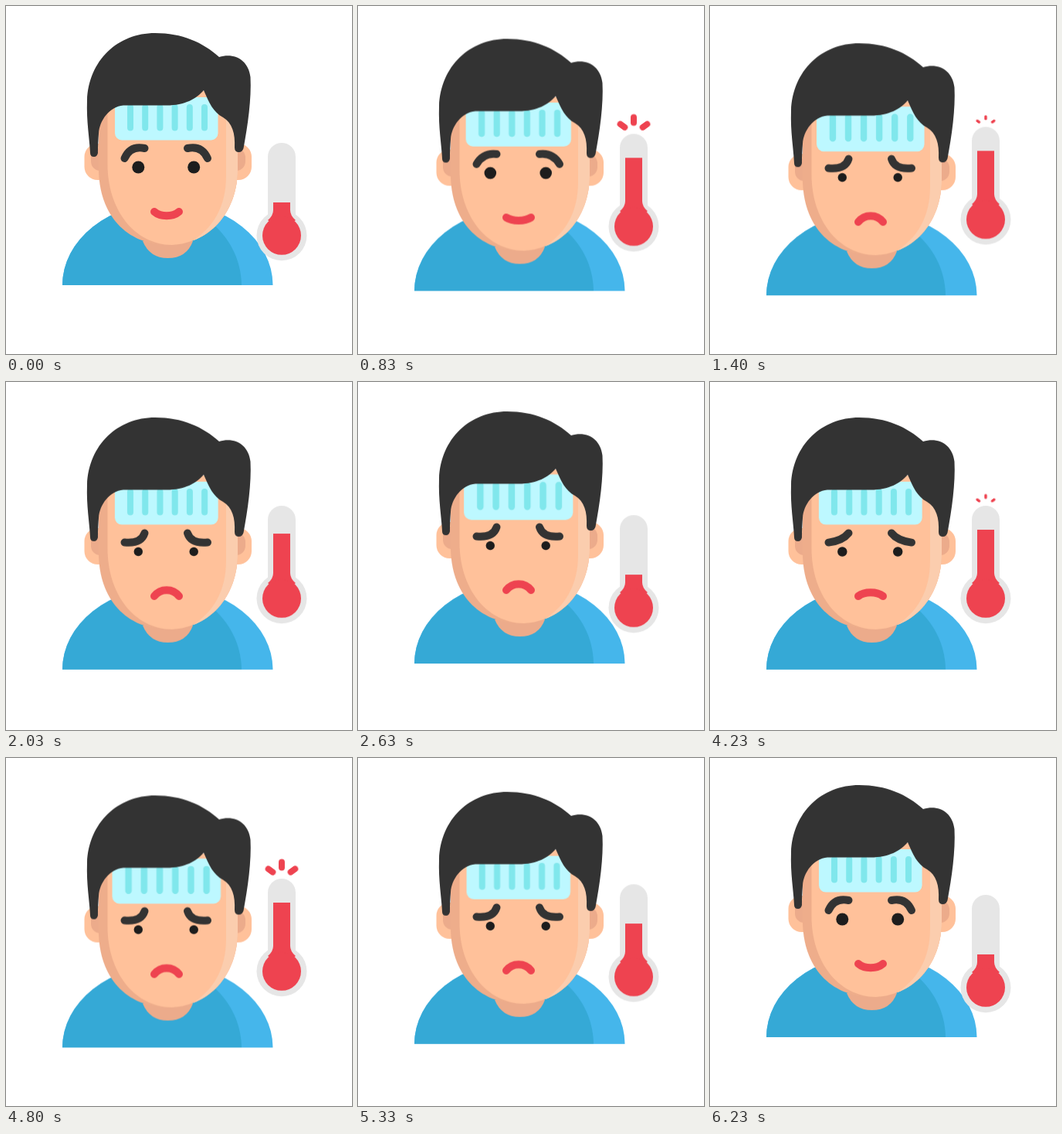
An HTML page for the animation above (6.26 s loop, 448x450 px).

```html
<!DOCTYPE html>
<html lang="en">
<head>
<meta charset="utf-8">
<title>Fever</title>
<style>
  :root {
    --cycle: 3130ms;
    --sine: cubic-bezier(.37, 0, .63, 1);
  }
  html, body { margin: 0; width: 100%; height: 100%; overflow: hidden; background: #fff; }
  svg { display: block; width: 448px; height: 450px; }

  .person, .thermometer, .level, .eye, .brow, .mouth, .spark {
    animation: var(--cycle) var(--sine) infinite;
  }
  .person { animation-name: sink; }
  .thermometer { animation-name: lift; }
  .level { animation-name: heat; transform-box: fill-box; transform-origin: 50% 100%; }
  .eye { animation-name: shrink; fill: #1d1d1d; }
  .brow { animation-name: worry; fill: none; stroke: #333; stroke-width: 10; stroke-linecap: round; }
  .mouth { animation-name: frown; fill: none; stroke: #ee4350; stroke-width: 10; stroke-linecap: round; }
  .spark { animation-name: burst; stroke: #ee4350; stroke-width: 8; stroke-linecap: round; }
  .pad {
    transform-origin: 207.5px 145.7px;
    animation: throb calc(var(--cycle) / 6) var(--sine) infinite alternate;
  }

  @keyframes sink { 50% { transform: translateY(13.6px); } }
  @keyframes lift { 50% { transform: translateY(-21.2px); } }
  @keyframes throb { to { transform: scale(1.058); } }
  @keyframes heat {
    0%, 1.9%, 82.6%, 100% { transform: scaleY(1); }
    22.4%, 60% { transform: scaleY(2.07); }
  }
  @keyframes shrink {
    0%, 22.8%, 99%, 100% { r: 8px; }
    41%, 84.3% { r: 5.7px; }
  }
  @keyframes worry {
    0%, 22.8%, 99%, 100% { d: path("M153.500 197Q161 180 179.500 184"); }
    41%, 84.3% { d: path("M153.500 196.500Q175 198.500 179.500 184.500"); }
  }
  @keyframes frown {
    0%, 22.8%, 99%, 100% { d: path("M192 266C200 273 216 273 224 266"); }
    41%, 84.3% { d: path("M192 266C200 255.500 216 255.500 224 266"); }
  }
  @keyframes burst {
    0%, 17.6%, 40%, 62.3%, 100% { transform: rotate(var(--turn)) translateY(-7.5px) scale(0); }
    28.8%, 51.1% { transform: rotate(var(--turn)) translateY(-19.1px) scale(1.1); }
  }
</style>
</head>
<body>
<svg viewBox="0 0 448 450">
  <defs>
    <path id="face" d="M120 110V210C120 270 156 309 210 309C262 309 300 268 300 210V110Z"/>
    <clipPath id="faceClip"><use href="#face"/></clipPath>
  </defs>

  <g class="person">
    <path fill="#45b6eb" d="M73 361A136 107 0 0 1 345.500 361Z"/>
    <path fill="#35a9d6" d="M73 361A136 107 0 0 1 209 254C262 264 304 305 305 361Z"/>
    <path fill="#ecab8b" d="M177 304Q186 326 209.500 326Q234 326 242 304Z"/>

    <rect x="101.500" y="178" width="216.500" height="47" rx="17" fill="#ffc19a"/>
    <rect x="110" y="184" width="200" height="29" rx="12" fill="#ecab8b"/>

    <use href="#face" fill="#eead8b"/>
    <g clip-path="url(#faceClip)">
      <path fill="#ffc19a" d="M131.500 100V205C131.500 262 165 308.500 215 309H300V100Z"/>
      <path fill="#fbcdae" d="M285 100V220C285 260 268 288 238 306L300 300V100Z"/>
    </g>

    <g class="pad">
      <rect x="141" y="118" width="133.500" height="55.500" rx="9" fill="#bdf8ff"/>
      <path stroke="#80e7ec" stroke-width="8" stroke-linecap="round"
        d="M161 131v26.500M180.200 131v26.500M199.400 131v26.500M218.600 131v26.500M237.800 131v26.500M257 131v26.500"/>
    </g>

    <path fill="#333" d="M109 190C108 170 104 150 105 122C107 70 145 35 193 35
      C228 35 255 47 276 66C296 60 314 70 316.500 92C318 120 313 155 307.500 184
      Q306 189 301.500 189Q296 189 296 183C297 165 293 151 281 144
      C268 137 263 125 256 109C246 120 232 128.500 208 128.500H152
      C134 130 121 148 120 165C119 180 119 188 119 190Q118 195 114 195Q109 195 109 190Z"/>

    <circle class="eye" cx="171.300" cy="208.500" r="8"/>
    <circle class="eye" cx="243.200" cy="208.500" r="8"/>
    <path class="brow" d="M153.500 197Q161 180 179.500 184"/>
    <g transform="matrix(-1 0 0 1 414.500 0)">
      <path class="brow" d="M153.500 197Q161 180 179.500 184"/>
    </g>
    <path class="mouth" d="M192 266C200 273 216 273 224 266"/>
  </g>

  <g class="thermometer">
    <g fill="#e6e6e6">
      <rect x="339" y="177" width="36" height="110" rx="18"/>
      <circle cx="357" cy="296.800" r="32.500"/>
    </g>
    <g fill="#ee4350">
      <rect class="level" x="346" y="254" width="22" height="43"/>
      <path d="M346 264Q346 271 339 277L357 290L375 277Q368 271 368 264Z"/>
      <circle cx="357" cy="296.800" r="25"/>
    </g>
    <g transform="translate(357 177)">
      <path class="spark" style="--turn: -54deg" d="M0-3.500V3.500"/>
      <path class="spark" style="--turn: 0deg" d="M0-3.500V3.500"/>
      <path class="spark" style="--turn: 54deg" d="M0-3.500V3.500"/>
    </g>
  </g>
</svg>
</body>
</html>
```
